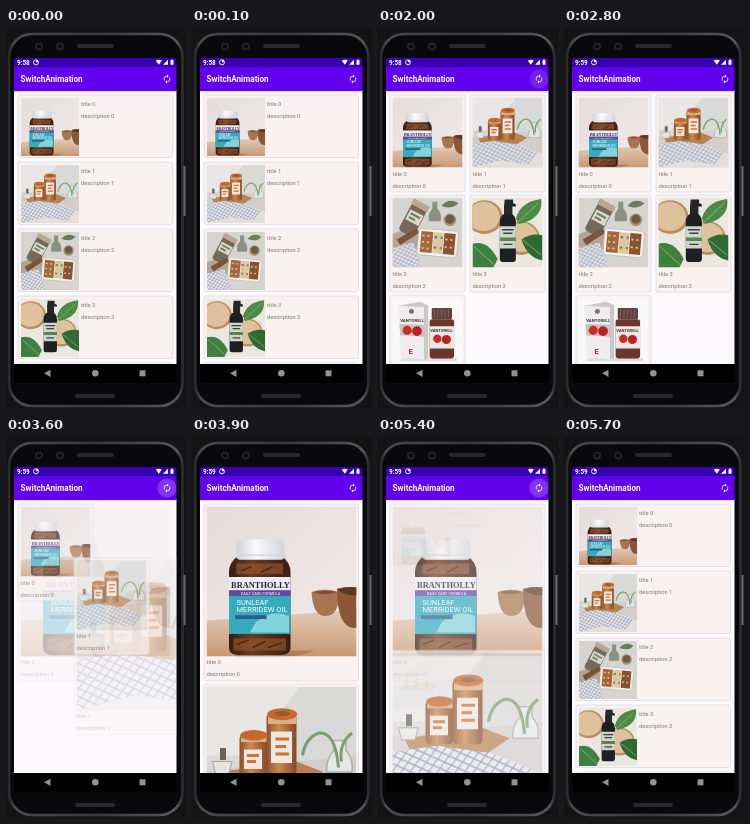
An HTML page for the animation above (6000 ms loop, 180x381 px).

```html
<!DOCTYPE html>
<html lang="en">
<head>
<meta charset="utf-8">
<title>SwitchAnimation</title>
<style>
html, body { margin: 0; height: 100%; overflow: hidden; background: #141415; }
svg { display: block; }
#stage { width: 100vw; height: 100vh; }
text { font-family: Roboto, sans-serif; }
.label { font-size: 5.77px; fill: #7d7878; }
.card { fill: #f9f2f1; stroke: #dcdae3; stroke-width: .8; }
</style>
</head>
<body>
<svg id="stage" viewBox="0 0 180 381">
<defs>
  <clipPath id="content"><rect x="8" y="63" width="162.5" height="273"/></clipPath>
  <linearGradient id="rim"><stop stop-color="#2a2a2c"/><stop offset=".03" stop-color="#4b4b4e"/><stop offset=".5" stop-color="#3a3a3c"/><stop offset=".97" stop-color="#58585b"/><stop offset="1" stop-color="#2c2c2e"/></linearGradient>
  <linearGradient id="wood" x2="0" y2="1"><stop stop-color="#e2cbb8"/><stop offset="1" stop-color="#c99873"/></linearGradient>
  <linearGradient id="wall" x2="1" y2="1"><stop stop-color="#e5dcdb"/><stop offset="1" stop-color="#f1ebea"/></linearGradient>
  <linearGradient id="amber"><stop stop-color="#351b12"/><stop offset=".35" stop-color="#6b3b22"/><stop offset="1" stop-color="#3a1d13"/></linearGradient>
  <linearGradient id="cap"><stop stop-color="#d2d3d9"/><stop offset=".4" stop-color="#fafafc"/><stop offset="1" stop-color="#d3d4da"/></linearGradient>
  <linearGradient id="jar"><stop stop-color="#8d5129"/><stop offset=".4" stop-color="#c98a52"/><stop offset="1" stop-color="#824a27"/></linearGradient>
  <pattern id="check" width="5" height="5" patternUnits="userSpaceOnUse" patternTransform="rotate(24) skewX(-12)">
    <path fill="#e6e6ea" d="M0 0H5V5H0Z"/><path stroke="#8690a6" stroke-width=".8" d="M0 2.5H5M2.5 0V5"/>
  </pattern>

  <symbol id="p0" viewBox="0 0 100 100">
    <path fill="url(#wall)" d="M0 0H100V100H0Z"/>
    <path fill="url(#wood)" d="M0 76L100 69V100H0Z"/>
    <path fill="#a8754e" d="M70 57Q79 54 88 57Q89 73 79 73Q71 73 70 57Z"/>
    <path fill="#7d5036" d="M71 57Q79 55 87 57Q79 60 71 57Z"/>
    <path fill="#8a5636" d="M87 55Q94 53 100 54V81Q87 82 87 55Z"/>
    <path fill="#5d3825" d="M87 55Q94 53 100 54V59Q92 60 87 55Z"/>
    <path fill="#8f5c37" opacity=".45" d="M18 96H72Q64 100 50 100H20Z"/>
    <path fill="url(#amber)" d="M21 33Q15 37 15 44V94Q15 99 21 99H50Q56 99 56 94V44Q56 37 50 33Z"/>
    <path fill="#9a5a30" opacity=".6" d="M18 88H53V96H18ZM20 38H51V45H20Z"/>
    <path stroke="#4b2818" stroke-width="1.2" d="M20 92L28 89M31 94L39 90M41 94L50 91M23 43L30 40M36 44L44 40"/>
    <rect x="20" y="22" width="32" height="13.500" rx="2.500" fill="url(#cap)"/>
    <path fill="#d5d6dc" d="M20.500 32H51.500V33H20.500Z"/>
    <path fill="#eeecf4" d="M15 47H56V56H15Z"/>
    <path fill="#6446a5" d="M15 56H56V59.500H15Z"/>
    <path fill="#35aabd" d="M15 59.500H56V85H15Z"/>
    <path fill="#83d3da" d="M33 77Q44 68 55 73V84H29Z"/>
    <path fill="#2b5f87" d="M19 72.500H40V75H19Z"/>
    <text x="36" y="54.500" font-size="5.600" font-weight="700" text-anchor="middle" style="font-family:'Liberation Serif',serif" fill="#25233c">BRANTHOLLY</text>
    <text x="36" y="58.700" font-size="2.600" text-anchor="middle" fill="#fff">DAILY CARE FORMULA</text>
    <g fill="#fff" font-size="5"><text x="20" y="65.500">SUNLEAF</text><text x="20" y="70.300">MERRIDEW OIL</text></g>
  </symbol>

  <symbol id="p1" viewBox="0 0 100 100">
    <path fill="#d9d9d8" d="M0 0H100V100H0Z"/>
    <path fill="#e9e7e5" d="M0 0H62L28 46H0Z"/>
    <path fill="#d3cecb" d="M0 56L100 46V100H0Z"/>
    <path fill="#b98253" d="M8 57L60 50L78 57L62 68L12 66Z"/>
    <path fill="url(#check)" d="M0 66L30 62L66 67L94 78L80 96L40 90L0 100Z"/>
    <path fill="#e4dfdd" d="M0 100L40 90L80 96L94 78L100 80V100Z"/>
    <path fill="#e6e5e3" stroke="#a5a4a2" stroke-width=".7" d="M4 50H17L15 58H6Z"/>
    <path fill="#6d6257" d="M9 41H13V49H9Z"/>
    <rect x="22" y="32" width="18.500" height="29" rx="3" fill="url(#jar)"/>
    <rect x="40" y="18" width="20" height="43" rx="3" fill="url(#jar)"/>
    <path fill="#d9b183" d="M23 32H40V37H23ZM41 19H60V25H41Z"/>
    <ellipse cx="31.500" cy="32.500" rx="9" ry="3.500" fill="#c8682f"/>
    <ellipse cx="50.500" cy="18.500" rx="10" ry="4" fill="#c8682f"/>
    <ellipse cx="50.500" cy="18" rx="5" ry="1.700" fill="#8f593a"/>
    <path fill="#f0e7de" d="M25 42H37V55H25ZM43 30H57V51H43Z"/>
    <path stroke="#d06f35" stroke-width="2" d="M27 46H35M27 50H33M46 35H55M46 40H53M46 45H55"/>
    <path fill="#e3e8e7" stroke="#a9aeac" d="M84 36H93V43Q98 47 97 57H80Q80 47 85 43Z"/>
    <path fill="none" stroke="#7f9c6c" stroke-width="2" d="M88 54Q86 30 75 31Q66 34 64 46M90 50Q88 38 97 31"/>
  </symbol>

  <symbol id="p2" viewBox="0 0 100 100">
    <path fill="#d6d4d1" d="M0 0H100V100H0Z"/>
    <path fill="#b3a594" d="M0 52L34 40L44 72L0 80Z"/>
    <path fill="url(#check)" d="M0 72L30 64L42 100H0Z"/>
    <g transform="rotate(28 30 28)">
      <rect x="19" y="8" width="24" height="46" rx="5" fill="#74695a"/>
      <rect x="18" y="4" width="26" height="9" rx="2" fill="#b8a88f"/>
      <path fill="#dcd7cc" d="M21 20H42V36H21Z"/>
      <path stroke="#708261" stroke-width="3" d="M24 25H39M24 31H34"/>
    </g>
    <path fill="#8b917f" d="M57 6H64V16Q71 22 69 34H52Q50 22 57 16Z"/>
    <circle cx="82" cy="32" r="9" fill="#a2917b"/><circle cx="82" cy="31" r="6.500" fill="#705a42"/>
    <path fill="#6d7d5c" d="M70 12Q80 0 94 8Q86 18 70 12Z"/>
    <path fill="#7a5437" d="M6 60L34 44L39 50L11 68Z"/>
    <g transform="rotate(5 64 66)">
      <rect x="36" y="46" width="57" height="38" rx="5" fill="#f3f1ed" stroke="#bbb6af"/>
      <path fill="#a2673b" d="M40 50H57V80H40Z"/><path fill="#dbc7a2" d="M58 50H72V80H58Z"/>
      <path fill="#8b5230" d="M73 50H89V80H73Z"/>
      <path stroke="#e2c59f" stroke-width="2.500" stroke-dasharray="3 4" d="M42 56H56M42 65H56M42 74H56M75 59H88M75 70H88"/>
      <path stroke="#70824b" stroke-width="3" stroke-dasharray="4 5" d="M59 57H71M59 72H71"/>
    </g>
  </symbol>

  <symbol id="p3" viewBox="0 0 100 100">
    <path fill="#eae6e0" d="M0 0H100V100H0Z"/>
    <ellipse cx="17" cy="28" rx="26" ry="24" fill="#b88d62"/><ellipse cx="16" cy="27" rx="23" ry="21" fill="#dfc19b"/>
    <ellipse cx="70" cy="58" rx="26" ry="24" fill="#b88d62"/><ellipse cx="70" cy="57" rx="23" ry="21" fill="#dec29e"/>
    <path fill="#4d8a46" d="M62 30Q68 6 98 2Q102 30 66 38Z"/>
    <path fill="#2f6a35" d="M70 60Q84 50 100 54V90Q78 86 70 60Z"/>
    <path fill="#3f7f40" d="M0 66Q22 60 36 88L30 100H0Z"/>
    <path fill="none" stroke="#a4c68d" d="M65 35L94 8M72 61L98 82M2 70L32 97"/>
    <path fill="#242729" d="M46 3H58V8L62 10V13H57V25H45V13Z"/>
    <path fill="#1d2022" d="M44 24H57Q62 28 62 35V88Q62 92 58 92H43Q39 92 39 88V35Q39 28 44 24Z"/>
    <path fill="#cfd5ca" d="M39 41H62V73H39Z"/><path fill="#5d8355" d="M39 57H62V62H39Z"/>
    <path stroke="#39443a" stroke-width="2" d="M42 46H59M44 51H57M44 67H57"/>
  </symbol>

  <symbol id="p4" viewBox="0 0 100 100">
    <path fill="#f8f8f9" d="M0 0H100V100H0Z"/>
    <path fill="#dedee0" d="M12 86H92V91H12Z"/>
    <path fill="#c9c7c7" d="M8 12L39 6L51 11V86L45 89V14Z"/>
    <path fill="#eeecec" d="M8 12L45 14V89L12 84Z"/>
    <circle cx="27" cy="20" r="3.500" fill="#77706e"/>
    <path fill="#c9c2c0" d="M10 38L45 39V56L11 54Z"/>
    <circle cx="21" cy="47" r="6.500" fill="#c92d29"/><circle cx="35" cy="48" r="7" fill="#b82423"/>
    <text x="11" y="35" font-size="6.200" font-weight="700" fill="#3b3635">VANTORELL</text>
    <text x="23" y="80" font-size="11" font-weight="700" fill="#b82a26">E</text>
    <rect x="56" y="15" width="29" height="16" rx="2" fill="#5f4340"/>
    <path stroke="#8a6c67" d="M60 17V29M65 17V29M70 17V29M75 17V29M80 17V29"/>
    <rect x="53" y="31" width="35" height="56" rx="4" fill="#6b372c"/>
    <path fill="#eee7e4" d="M53 41H88V73H53Z"/>
    <text x="54" y="49" font-size="5.800" font-weight="700" fill="#3b3635">VANTORELL</text>
    <circle cx="64" cy="59" r="6" fill="#c92d29"/><circle cx="77" cy="60" r="6.500" fill="#b82423"/>
  </symbol>
</defs>

<rect width="180" height="381" fill="#141415"/>
<rect x="3" y="6" width="173.500" height="372" rx="23" fill="#09090b" stroke="url(#rim)" stroke-width="2.600"/>
<path stroke="#6a6a6d" stroke-width="2" d="M178.500 138V188"/>
<g fill="#222327"><circle cx="33" cy="18.500" r="4"/><circle cx="54" cy="18.500" r="4"/></g>
<g fill="#07080c"><circle cx="33" cy="18.500" r="2"/><circle cx="54" cy="18.500" r="2"/></g>
<g fill="#29292b"><rect x="71" y="16" width="37" height="4" rx="2"/><rect x="69" y="366" width="40" height="4" rx="2"/></g>

<rect x="8" y="30" width="162.500" height="325" rx="3"/>
<rect x="8" y="62" width="162.500" height="274" fill="#fcfafd"/>
<g id="list" clip-path="url(#content)"></g>
<path opacity=".1" d="M8 63H170.500V64.500H8Z"/>
<path fill="#3700b3" d="M8 39V33Q8 30 11 30H167.500Q170.500 30 170.500 33V39Z"/>
<path fill="#6200ee" d="M8 39H170.500V63H8Z"/>
<g fill="#fff">
  <text id="clock" x="11" y="36.800" font-size="6.300" font-weight="700"></text>
  <circle cx="30" cy="34.300" r="2.500" fill="none" stroke="#fff" stroke-width=".9"/><path d="M30 34.300V32H32V34.300Z"/>
  <path d="M149.800 32.500Q152.800 30.800 155.800 32.500L152.800 36.800ZM162 31.800V36.800H157ZM164.500 32.200H165.300V31.500H166.700V32.200H167.500V36.800H164.500Z"/>
  <text x="14.600" y="54" font-size="8.150" font-weight="700">SwitchAnimation</text>
  <circle id="ripple" cx="161" cy="51" r="9.500"/>
  <path transform="translate(156.060 46.060) scale(.412)" d="M12 6v3l4-4-4-4v3c-4.420 0-8 3.580-8 8 0 1.570.46 3.030 1.240 4.260L6.700 14.800c-.45-.83-.7-1.790-.7-2.800 0-3.310 2.690-6 6-6zm6.760 1.740L17.300 9.200c.44.84.7 1.790.7 2.800 0 3.310-2.690 6-6 6v-3l-4 4 4 4v-3c4.420 0 8-3.580 8-8 0-1.570-.46-3.030-1.240-4.260z"/>
</g>
<g fill="#929294"><path d="M38 345.300L44.500 341.700V348.900Z"/><circle cx="89.300" cy="345.300" r="3.300"/><path d="M133.500 342.300H139.500V348.300H133.500Z"/></g>
</svg>

<script>
const LOOP = 6000, STEP = 100, MOVE = 250, ADD = 120, COUNT = 5;
const $ = id => document.getElementById(id);

// Card size, photo box, text positions and placement of each layout
const layouts = {
  list: { w: 154.5, h: 62.5, photo: [3, 3, 58], text: [63, 11, 23], at: i => [12, 67 + 67 * i] },
  grid: { w: 75, h: 97, photo: [2.5, 2.5, 70], text: [2.5, 80.7, 92.7], at: i => [12 + 80 * (i % 2), 67 + 100 * (i >> 1)] },
  big: { w: 154.5, h: 177, photo: [2.5, 2.5, 150], text: [2.5, 160, 172.3], at: i => [12, 67 + 180 * i] }
};
const switches = [
  { press: 1710, start: 1746, from: 'list', to: 'grid' },
  { press: 3390, start: 3508, from: 'grid', to: 'big' },
  { press: 5195, start: 5308, from: 'big', to: 'list' }
];

function makeCard({ w, h, photo: [px, py, size], text: [tx, y1, y2] }, i) {
  const g = document.createElementNS('http://www.w3.org/2000/svg', 'g');
  g.innerHTML = `<rect class="card" width="${w}" height="${h}" rx="2"/>
    <use href="#p${i}" x="${px}" y="${py}" width="${size}" height="${size}"/>
    <text class="label" x="${tx}" y="${y1}">title ${i}</text>
    <text class="label" x="${tx}" y="${y2}">description ${i}</text>`;
  return g;
}
for (const name in layouts)
  layouts[name].cards = Array.from({ length: COUNT }, (_, i) => makeCard(layouts[name], i));

const clamp = x => Math.max(0, Math.min(1, x));
const ease = x => .5 - .5 * Math.cos(Math.PI * clamp(x));

function place(card, [x, y], alpha) {
  if (alpha <= 0) return;
  card.setAttribute('transform', `translate(${x} ${y})`);
  card.setAttribute('opacity', alpha);
  $('list').append(card);
}

function draw(t) {
  const now = switches.findLast(s => t >= s.start) || { start: -LOOP, from: 'big', to: 'list' };
  const from = layouts[now.from], to = layouts[now.to];
  const age = t - now.start, p = ease(age / MOVE);
  // The big layout holds only two cards on screen; the others do not take part in its changes
  const shared = i => i < 2 || (now.from !== 'big' && now.to !== 'big');
  const pos = i => {
    const [x, y] = from.at(i), [u, v] = to.at(i);
    return [x + (u - x) * p, y + (v - y) * p];
  };
  $('list').replaceChildren();
  to.cards.forEach((card, i) => shared(i)
    ? place(card, pos(i), p)
    : place(card, to.at(i), ease((age - MOVE) / ADD)));
  from.cards.forEach((card, i) => shared(i) && place(card, pos(i), 1 - p));

  const glow = s => clamp((t - s.press) / 60) * clamp((s.start + 400 - t) / 250);
  $('ripple').setAttribute('opacity', .2 * Math.max(...switches.map(glow)));
  $('clock').textContent = t < 2800 ? '9:58' : '9:59';
}

let last = -1;
function tick() {
  const t = Math.floor(performance.now() % LOOP / STEP) * STEP;
  if (t !== last) draw(last = t);
  requestAnimationFrame(tick);
}
tick();
</script>
</body>
</html>
```
